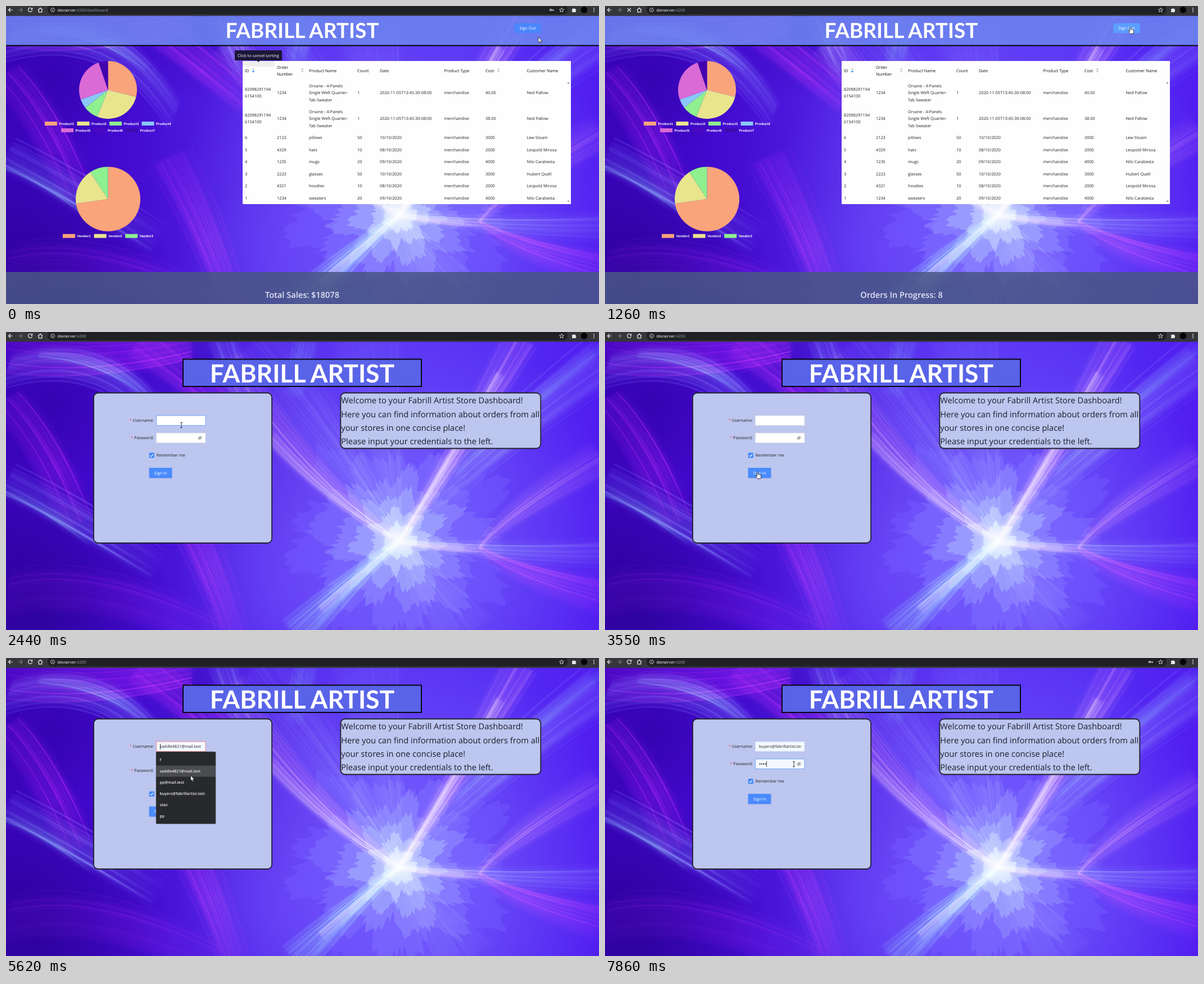
An HTML page with a canvas that plays this animation: 1055 px wide and 531 px high, repeating every 8000 ms.

```html
<!DOCTYPE html>
<html lang="en">
<head>
<meta charset="utf-8">
<title>Store dashboard</title>
<style>
  html, body { margin: 0; width: 100%; height: 100%; overflow: hidden; background: #4a18e0; }
  canvas, svg { position: absolute; left: 0; top: 0; width: 100%; height: 100%; display: block; }
  text { font: 7.33px "Open Sans", "Noto Sans", sans-serif; fill: #222; text-rendering: geometricPrecision; white-space: pre; }
  .white { fill: #fff; }
  .mid { text-anchor: middle; }
  .end { text-anchor: end; }
  .head { font-weight: 500; fill: #111; }
  .err { fill: #ff4d5a; }
  .mail { font-size: 7.1px; }
  .item { font-size: 6.85px; font-weight: 600; fill: #f1f1f1; }
  .total { font-size: 14.6px; font-weight: 600; fill: #e4e4f6; }
  .welcome { font-size: 14.62px; fill: #1c1d2b; }
  .legend { font: bold 6.15px "Liberation Sans", Arial, sans-serif; fill: #fff; }
  .mark { font-family: Lato, sans-serif; font-weight: 700; fill: #fff; text-anchor: middle; }
  .line { fill: none; stroke: #e8eaed; stroke-width: 1.2; }
</style>
</head>
<body>
<canvas id="sky" width="1055" height="531"></canvas>
<svg id="ui" viewBox="0 0 1055 531"></svg>
<script>
const BRAND = "Fabrill Artist";
const MAILS = ["f", "saddle4821@mail.test", "pp@mail.test", "buyers@fabrillartist.test", "olan", "pp"];
const LOOP = 8000;

// ---- backdrop, painted once ----
function paintSky() {
  const c = document.getElementById("sky").getContext("2d");
  const SX = 700, SY = 372;
  let seed = 41;
  const rnd = () => {
    seed = (seed + 0x6D2B79F5) | 0;
    let v = Math.imul(seed ^ (seed >>> 15), 1 | seed);
    v = (v + Math.imul(v ^ (v >>> 7), 61 | v)) ^ v;
    return ((v ^ (v >>> 14)) >>> 0) / 4294967296;
  };
  const off = s => (rnd() - 0.5) * s;

  const base = c.createLinearGradient(0, 0, 1055, 0);
  ["#3b04be", "#430ad0", "#5222e6", "#5a34f4", "#5630f4", "#501cf0"]
    .forEach((col, i, all) => base.addColorStop(i / (all.length - 1), col));
  c.fillStyle = base;
  c.fillRect(0, 0, 1055, 531);

  const glow = (x, y, r, rgb, a) => {
    const g = c.createRadialGradient(x, y, 0, x, y, r);
    g.addColorStop(0, `rgba(${rgb},${a})`);
    g.addColorStop(1, `rgba(${rgb},0)`);
    c.fillStyle = g;
    c.fillRect(x - r, y - r, r * 2, r * 2);
  };
  glow(50, 490, 250, "34,0,130", 0.6);
  glow(90, 130, 150, "42,0,150", 0.4);
  glow(330, 60, 110, "46,0,170", 0.4);
  glow(500, 450, 160, "94,58,252", 0.5);
  glow(SX, SY, 400, "132,112,255", 0.65);

  // uneven flat layers around the bright centre
  const layer = (r, rgb, a) => {
    const p = rnd() * 6;
    c.fillStyle = `rgba(${rgb},${a})`;
    c.beginPath();
    for (let i = 0; i < 200; i++) {
      const q = i / 200 * Math.PI * 2;
      const d = r * (0.88 + 0.1 * Math.sin(q * 7 + p) + 0.08 * Math.sin(q * 13 - p) + off(0.16));
      c.lineTo(SX + d * Math.cos(q) * 0.95, SY + d * Math.sin(q));
    }
    c.fill();
  };
  layer(215, "116,94,255", 0.4);
  layer(170, "130,116,255", 0.45);
  layer(128, "148,146,255", 0.5);
  layer(92, "170,180,255", 0.55);
  layer(60, "200,214,255", 0.6);
  layer(34, "224,242,255", 0.65);

  // a bundle: one soft tapering band under fine curved lines
  c.globalCompositeOperation = "screen";
  const streak = (x0, y0, cx, cy, x1, y1, rgb, n, wide, tip, a, fade = 1) => {
    const tint = s => {
      const g = c.createLinearGradient(x0, y0, x1, y1);
      g.addColorStop(0, `rgba(${rgb},${s * 0.5})`);
      g.addColorStop(0.6, `rgba(${rgb},${s})`);
      g.addColorStop(1, `rgba(${rgb},${s * fade})`);
      return g;
    };
    const len = Math.hypot(x1 - x0, y1 - y0), nx = (y0 - y1) / len, ny = (x1 - x0) / len;
    const at = (x, y, d) => [x + nx * d, y + ny * d];
    const h = wide / 2, e = tip / 2, m = (h + e) / 2;
    c.filter = "blur(5px)";
    c.fillStyle = tint(a * 1.3);
    c.beginPath();
    c.moveTo(...at(x0, y0, h));
    c.quadraticCurveTo(...at(cx, cy, m), ...at(x1, y1, e));
    c.lineTo(...at(x1, y1, -e));
    c.quadraticCurveTo(...at(cx, cy, -m), ...at(x0, y0, -h));
    c.fill();
    c.filter = "none";
    for (let i = 0; i < n; i++) {
      const k = off(1) + off(0.6);
      c.strokeStyle = tint(a * (0.4 + rnd()));
      c.lineWidth = 0.5 + rnd() * rnd() * 4;
      c.beginPath();
      c.moveTo(...at(x0, y0, k * wide));
      c.quadraticCurveTo(...at(cx + off(6), cy + off(6), k * m * 2), ...at(x1, y1, k * tip));
      c.stroke();
    }
  };
  const pink = "255,150,245", cyan = "90,225,255", blue = "80,110,255", violet = "160,30,255", pale = "255,235,255";
  streak(915, 10, 800, 215, SX, SY, pink, 30, 60, 10, 0.15);
  streak(880, 75, 785, 240, SX, SY, pale, 8, 16, 4, 0.3);
  streak(1060, 55, 910, 160, 750, 310, blue, 30, 75, 40, 0.24, 0.2);
  streak(1060, 25, 900, 150, 800, 250, cyan, 8, 20, 12, 0.14, 0.2);
  streak(395, 60, 540, 270, SX, SY, pink, 30, 60, 12, 0.14);
  streak(470, 190, 570, 300, SX, SY, pale, 8, 20, 4, 0.22);
  streak(440, 20, 590, 200, SX, SY, blue, 22, 110, 14, 0.13);
  streak(515, 540, 600, 455, SX, SY, cyan, 34, 62, 10, 0.22);
  streak(560, 495, 630, 435, SX, SY, pale, 8, 14, 4, 0.25);
  streak(1060, 392, 860, 396, SX, SY, blue, 24, 44, 8, 0.2);
  streak(842, 386, 770, 384, SX, SY, pink, 12, 14, 8, 0.2);
  streak(1060, 225, 890, 325, 842, 385, pink, 22, 60, 10, 0.12, 0.8);
  streak(1060, 470, 900, 430, 842, 387, violet, 22, 60, 10, 0.2, 0.6);
  streak(820, 540, 750, 450, SX, SY, blue, 18, 100, 8, 0.14);
  streak(640, 10, 670, 180, SX, SY, blue, 18, 120, 8, 0.12);
  streak(0, 70, 190, 10, 300, 195, blue, 30, 60, 45, 0.22, 0.3);
  streak(60, 38, 170, 45, 250, 110, cyan, 7, 14, 12, 0.16, 0.2);
  streak(0, 35, 150, 60, 330, 20, violet, 24, 70, 50, 0.2);
  streak(235, 18, 310, 70, 430, 170, violet, 24, 60, 50, 0.2, 0.4);
  streak(0, 265, 110, 320, 270, 420, blue, 26, 50, 50, 0.22, 0.1);
  streak(0, 285, 70, 310, 150, 375, cyan, 6, 14, 12, 0.16, 0.1);
  streak(0, 120, 70, 190, 130, 340, violet, 18, 60, 60, 0.18, 0.3);
  streak(0, 470, 150, 430, 380, 540, violet, 16, 80, 60, 0.1, 0.4);
  streak(290, 270, 360, 400, 405, 540, violet, 24, 60, 40, 0.18, 0.4);
  streak(385, 10, 400, 60, 425, 115, blue, 16, 50, 40, 0.24, 0.3);
  streak(535, 10, 525, 60, 512, 115, cyan, 12, 40, 30, 0.14, 0.2);
  glow(SX, SY, 36, "255,255,255", 0.6);
}

// ---- markup helpers ----
const txt = (x, y, s, cls = "") => `<text x="${x}" y="${y + 2.6}" class="${cls}">${s}</text>`;
const box = (x, y, w, h, fill, more = "") => `<rect x="${x}" y="${y}" width="${w}" height="${h}" fill="${fill}" ${more}/>`;
const path = (d, more = "") => `<path d="${d}" ${more}/>`;
const group = (id, body) => `<g id="${id}">${body}</g>`;
const mark = (y, size) => `<text x="527" y="${y}" class="mark" style="font-size:${size}px">${BRAND.toUpperCase()}</text>`;

function browserBar() {
  return box(0, 0, 1055, 17.5, "#35363a") + box(74, -3, 925, 18, "#202124", 'rx="8"') +
    path("M12 7H4.5M8 3.5L4.5 7 8 10.5", 'class="line"') +
    path("M21.5 7H29M25.5 3.5L29 7 25.5 10.5", 'class="line" style="stroke:#77797d"') +
    group("reload", path("M46 4.6A3.6 3.6 0 1 0 46.6 8", 'class="line"') + path("M47.3 2.8V6.5H43.6Z", 'fill="#e8eaed"')) +
    group("stop", path("M40 4L46 10M46 4L40 10", 'class="line"')) +
    path("M57 7L61 3.3 65 7M58.2 6.5V10.8H63.8V6.5", 'class="line"') +
    '<circle cx="83" cy="7" r="3.5" class="line" style="stroke-width:.8"/>' + path("M83 6.5V9M83 4.8V5.6", 'class="line" style="stroke-width:.9"') +
    '<text x="91.5" y="9.7" class="white" style="font-size:7.2px">devserver<tspan fill="#9aa0a6">:4200<tspan id="urlTail">/dashboard</tspan></tspan></text>' +
    group("key", '<circle cx="969" cy="7" r="1.5" class="line"/>' + path("M970.5 7H975M973.5 7V9", 'class="line"')) +
    path("M988.5 3L989.6 5.9 992.6 6 990.2 7.9 991.1 10.8 988.5 9.1 985.9 10.8 986.8 7.9 984.4 6 987.4 5.9Z", 'class="line" style="stroke-width:.8"') +
    path("M1007 5H1009.3A1.3 1.3 0 0 1 1011.7 5H1013.5V7A1.2 1.2 0 0 1 1013.5 9.3V11H1007V9A1.2 1.2 0 0 0 1007 7Z", 'fill="#e8eaed"') +
    '<circle cx="1028.5" cy="7" r="5.8" fill="#050505"/>' +
    [4, 7, 10].map(y => `<circle cx="1046" cy="${y}" r=".9" fill="#e8eaed"/>`).join("");
}

function pie(cx, cy, r, slices) {
  const pt = a => `${cx + r * Math.sin(a * Math.PI / 180)} ${cy - r * Math.cos(a * Math.PI / 180)}`;
  let from = 0;
  return slices.map(([to, fill]) => {
    const d = `M${cx} ${cy}L${pt(from)}A${r} ${r} 0 ${to - from > 180 ? 1 : 0} 1 ${pt(to)}Z`;
    from = to;
    return path(d, `fill="${fill}"`);
  }).join("");
}

const HUES = ["#f9a47a", "#e8e58d", "#8ef08e", "#8ac8fa", "#da6ad6", "#4a08c0", "#3e0cb0"];
const legend = (x, y, gap, label, first, n) => Array.from({ length: n }, (_, i) =>
  box(x + i * gap, y - 3.5, 22, 7, HUES[first + i]) +
  `<text x="${x + 25.5 + i * gap}" y="${y + 2}" class="legend">${label}${first + i + 1}</text>`).join("");

const COLS = [425, 482, 539, 625, 665, 779.5, 853, 926.5];
const sorter = (x, down) => path(`M${x - 2.5} 113.8h5l-2.5 -3z`, 'fill="#bfbfbf"') +
  path(`M${x - 2.5} 115.8h5l-2.5 3z`, `fill="${down}"`);
// cell text may hold several lines split by "|"
const cell = (x, y, s, cls) => s.split("|").map((part, i, all) =>
  txt(x, y + (i - (all.length - 1) / 2) * 12.2, part, cls)).join("");
const row = (y, line, cls) => line.split(";").map((s, i) => cell(COLS[i], y, s, cls)).join("");

function table() {
  const top = cost => `82098291194|6154100;1234;Orvane - 4-Panels|Single Weft Quarter-|Tab Sweater;1;2020-11-05T13:45:30-08:00;merchandise;${cost};Ned Pallow`;
  const rest = [
    "6;2123;pillows;50;10/10/2020;merchandise;3000;Lew Stoam",
    "5;4329;hats;10;08/10/2020;merchandise;2000;Leopold Mirsoa",
    "4;1235;mugs;20;09/10/2020;merchandise;4000;Nilo Carabesta",
    "3;2223;glasses;50;10/10/2020;merchandise;3000;Hubert Quell",
    "2;4321;hoodies;10;08/10/2020;merchandise;2000;Leopold Mirosa",
    "1;1234;sweaters;20;09/10/2020;merchandise;4000;Nilo Carabesta"];
  return box(421, 98, 584, 255, "#fefefe") +
    group("tip", box(421, 98, 57, 10, "#eeeeee") + box(407, 79, 84, 18, "#1b1638", 'rx="1"') +
      path("M446 97H452L449 100Z", 'fill="#1b1638"') + txt(449, 88, "Click to cancel sorting", "white mid")) +
    row(115, "ID;Order|Number;Product Name;Count;Date;Product Type;Cost;Customer Name", "head") +
    sorter(440, "#1890ff") + sorter(527, "#bfbfbf") + sorter(876, "#bfbfbf") +
    row(154.7, top("40.00")) + row(200.7, top("38.00")) +
    rest.map((s, i) => row(234.5 + i * 21.55, s)).join("") +
    path("M998.5 138H1002.5L1000.5 135.5ZM998.5 347H1002.5L1000.5 349.5Z", 'fill="#777"');
}

function dashboard() {
  return box(0, 17.5, 1055, 52.5, "rgba(109,132,239,.88)") + box(0, 69.5, 1055, 2, "#05040c") + mark(57, 37) +
    box(904.5, 30.8, 47.5, 17.4, "#4a86fa", 'id="out" rx="1"') + txt(928, 39.5, "Sign Out", "white mid") +
    pie(181.5, 149.5, 51.5, [[104, HUES[0]], [202, HUES[1]], [232, HUES[2]], [250.5, HUES[3]], [341, HUES[4]], [360, "#4203ae"]]) +
    legend(69, 209.5, 57.5, "Product", 0, 4) + legend(98, 221.5, 57.5, "Product", 4, 3) +
    pie(181.5, 344, 57.5, [[262, HUES[0]], [326.7, HUES[1]], [360, HUES[2]]]) +
    legend(101, 409.8, 55.6, "Vendor", 0, 3) +
    table() + box(0, 474, 1055, 57, "rgba(73,87,132,.86)") +
    '<text id="sales" x="527" y="520.3" class="total mid">Total Sales: $18078</text>' +
    '<text id="orders" x="527.5" y="520.3" class="total mid">Orders In Progress: 8</text>';
}

function login() {
  const panel = (x, w, h) => box(x, 108.5, w, h, "#bcc6ef", 'rx="8" stroke="#20212c" stroke-width="1.8"');
  const field = (id, y, label, star) => txt(star, y, "*", "err") + txt(263, y, label + ":", "end") +
    box(267.5, y - 8.8, 87.5, 17.6, "#fff", `id="${id}" stroke-width=".8"`);
  const warn = (y, what) => txt(267, y, "Please input your", "err") + txt(267, y + 12, what + "!", "err");
  const eye = path("M341.3 188.8Q345 184.3 348.7 188.8Q345 193.3 341.3 188.8ZM342.3 192L347.7 185.6", 'fill="none" stroke="#777" stroke-width=".8"') +
    '<circle cx="345" cy="188.8" r="1.2" fill="#777"/>';
  const lines = [`Welcome to your ${BRAND} Store Dashboard!`,
    "Here you can find information about orders from all",
    "your stores in one concise place!", "Please input your credentials to the left."];
  return box(315, 48.5, 424, 48.5, "#5963e8", 'stroke="#07060f" stroke-width="2"') + mark(90, 44.5) +
    panel(156, 317, 267.5) + panel(595.3, 356, 99) +
    lines.map((s, i) => `<text x="596.3" y="${127.2 + i * 24.4}" class="welcome">${s}</text>`).join("") +
    '<clipPath id="clip"><rect x="268" y="148" width="81" height="20"/></clipPath>' +
    field("userBox", 157.8, "Username", 219.5) +
    '<text id="userText" x="274" y="160.4" class="mail" clip-path="url(#clip)"></text>' +
    group("userErr", warn(173, "username")) +
    group("pass", field("passBox", 188.8, "Password", 222) + eye +
      [0, 1, 2, 3].map(i => `<circle class="dot" cx="${275.6 + i * 3.25}" cy="188.8" r="1.15" fill="#222"/>`).join("") +
      group("passErr", warn(204, "password"))) +
    group("rest", box(254.8, 215.3, 9, 9, "#3f87fa", 'rx="1"') +
      path("M256.8 219.8L258.7 221.8 262 217.8", 'fill="none" stroke="#fff" stroke-width="1.2"') +
      txt(267.8, 219.8, "Remember me") + box(254.5, 260, 41, 1, "rgba(60,80,180,.25)") +
      box(254.5, 242, 41, 18, "#4a8bfd", 'rx="1"') + txt(275, 251, "Sign In", "white mid")) +
    group("menu", box(267, 167, 106, 128.5, "#28292c", 'rx="1.5" stroke="#55565c" stroke-width=".5"') +
      box(267, 0, 106, 20, "#4b4c50", 'id="pick"') +
      MAILS.map((s, i) => txt(273.5, 181.8 + i * 20, s, "item")).join("")) +
    box(274, 0, 0.8, 10, "#111", 'id="caret"');
}

const pointers =
  group("arrow", path("M0 0V9.5L2.2 7.5 3.7 10.8 5.2 10.1 3.8 6.9H6.8Z", 'fill="#fff" stroke="#111" stroke-width=".7"')) +
  group("hand", path("M-1 1Q0 -.6 1 1V4.3Q2 3.6 2.8 4.7Q4 4.1 4.5 5.2Q6 4.8 6 6.5V9L4.8 12H-.4L-3.6 8Q-4 6.4 -2.4 6.7L-1 8Z", 'fill="#fff" stroke="#111" stroke-width=".8"')) +
  group("beam", path("M-2 -4.5H2M0 -4.5V4.5M-2 4.5H2", 'fill="none" stroke="#222" stroke-width=".9"'));

// ---- timeline ----
const track = s => s.trim().split(/\s*\|\s*/).map(k => k.split(" "));
const MOVES = track(`0 947 55.5 arrow|120 964 62 arrow|240 941 36 arrow|390 934.7 37.5 hand
  |1780 560 190 arrow|1900 330 243 arrow|2020 373 121 arrow|2170 335 154 beam|2290 308 158 beam
  |2440 312 166 beam|2560 322 184 beam|2680 328 192 beam|2800 328 195 beam|3040 290 230 arrow
  |3160 228 284 arrow|3280 261 271 arrow|3430 270 256 hand|3550 271.5 249.5 hand
  |4090 272 273 hand|4210 288 166 arrow|4360 270.5 264 hand|4510 284 203 arrow|4630 263 284 arrow
  |5020 285 225 arrow|5140 300 158 beam|5380 318 180 arrow|5500 326 199 arrow|5620 328.5 209.5 arrow
  |5770 330 256 arrow|5890 330 244 arrow|6160 329 222 arrow|6280 327 203 beam|6550 333 165 beam|6670 336 189.3 beam`);
const PICKS = track("0 -1|5380 0|5500 1|5770 4|5890 3|6040 -1");
const TYPED = track("0 0|7470 1|7590 2|7740 3|7860 4");
const held = (keys, t) => keys.filter(k => +k[0] <= t).pop();
const clamp = v => Math.max(0, Math.min(1, v));

paintSky();
document.getElementById("ui").innerHTML = group("dash", dashboard()) + group("login", login()) + browserBar() + pointers;

const $ = id => document.getElementById(id);
const set = (id, attrs) => { for (const k in attrs) $(id).setAttribute(k, attrs[k]); };
const show = (id, on) => { $(id).style.display = on ? "" : "none"; };
const dots = [...document.querySelectorAll(".dot")];

function draw(t) {
  const within = (a, b) => t >= a && t < b;
  const inLogin = t >= 1500;
  show("dash", !inLogin);
  show("login", inLogin);
  show("stop", within(630, 1500));
  show("reload", !within(630, 1500));
  show("urlTail", t < 780);
  show("key", t < 780 || t >= 7470);
  show("tip", t < 120);
  set("out", { fill: t < 390 ? "#4a86fa" : "#5c9eff" });

  const fade = clamp((Math.floor((t - 30) / 120) - 4) / 6);
  set("sales", { opacity: 1 - fade });
  set("orders", { opacity: fade });

  const [, x, y, kind] = held(MOVES, t);
  for (const id of ["arrow", "hand", "beam"]) show(id, id === kind);
  set(kind, { transform: `translate(${x} ${y})` });

  const userBad = within(3670, 6040), passBad = within(3670, 7470);
  const passDy = userBad ? 11.2 : 0;
  const pick = +held(PICKS, t)[1];
  const typed = +held(TYPED, t)[1];
  const filled = t >= 6040, userFocus = within(5140, 6040), passFocus = t >= 6280;
  const over = mid => kind === "beam" && Math.abs(y - mid) < 9;
  const border = (bad, active, plain) => bad ? "#ff7078" : active ? "#5a9cff" : plain;
  show("userErr", userBad);
  show("passErr", passBad);
  set("pass", { transform: `translate(0 ${passDy})` });
  set("rest", { transform: `translate(0 ${passDy + (passBad ? 11.2 : 0)})` });
  set("userBox", { stroke: border(userBad, over(157.8), filled ? "#c3d5fb" : "#d9d9e4"), fill: filled || pick >= 0 ? "#f4f8ff" : "#fff" });
  set("passBox", { stroke: border(passBad, passFocus || over(188.8 + passDy), "#d9d9e4"), fill: passFocus ? "#f4f7ff" : "#fff" });
  $("userText").textContent = filled ? MAILS[3] : pick >= 0 ? MAILS[pick] : "";
  dots.forEach((d, i) => { d.style.display = i < typed ? "" : "none"; });

  show("menu", within(5260, 6040));
  show("pick", pick >= 0);
  set("pick", { y: 171.6 + pick * 20 });
  show("caret", userFocus || (passFocus && !within(6910, 7470)));
  set("caret", { x: 274 + typed * 3.25, y: userFocus ? 152.8 : 183.8 });
}

const start = performance.now();
function tick() {
  draw((performance.now() - start) % LOOP);
  requestAnimationFrame(tick);
}
tick();
</script>
</body>
</html>
```
